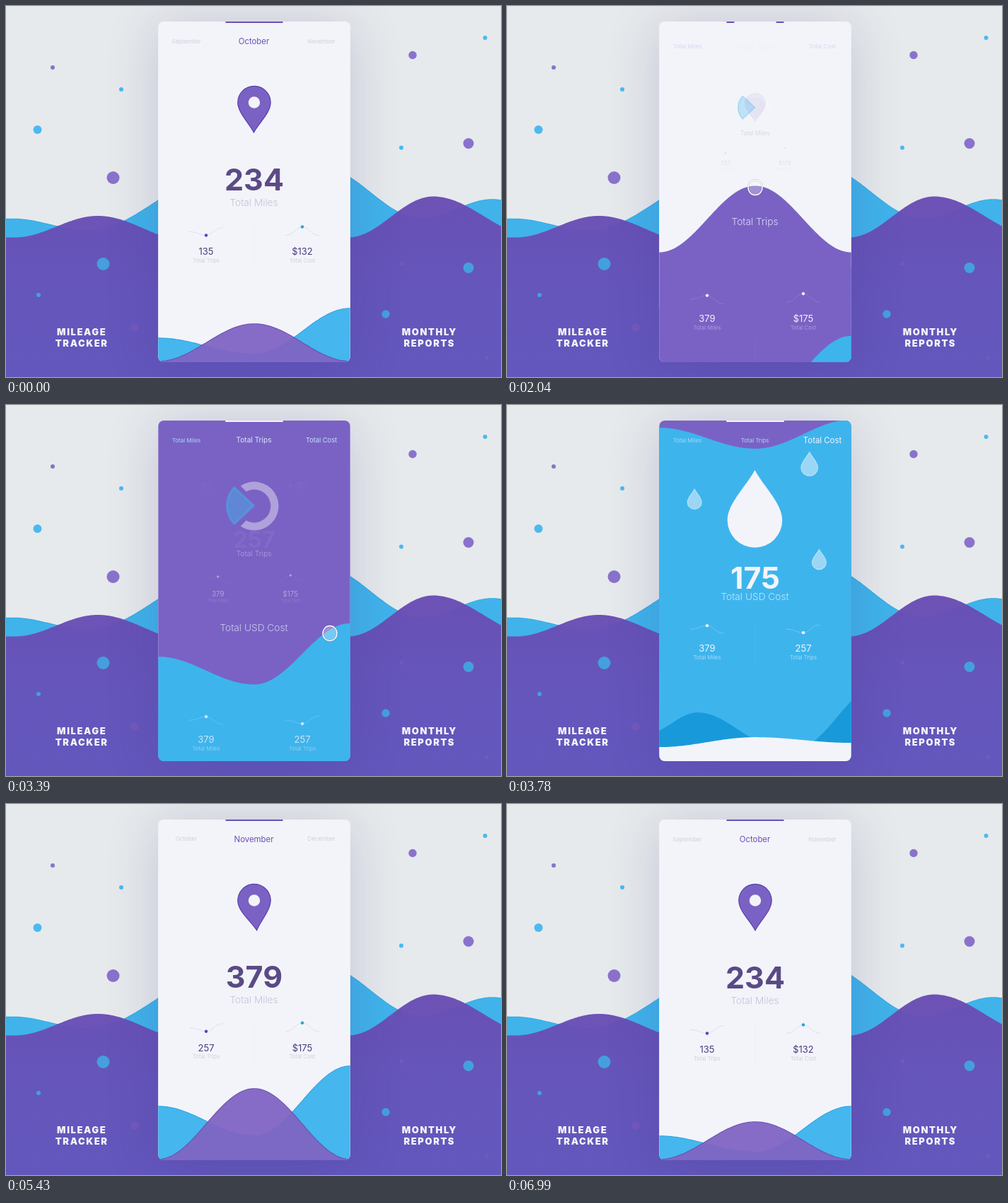
An HTML page with a canvas that plays this animation: 700 px wide and 525 px high, repeating every 7350 ms.

```html
<!DOCTYPE html>
<html lang="en">
<head>
<meta charset="utf-8">
<title>Mileage tracker</title>
<style>
html, body { margin: 0; width: 100%; height: 100%; overflow: hidden; background: #e6eaec; }
canvas { display: block; }
</style>
</head>
<body>
<canvas id="stage" width="700" height="525"></canvas>
<script>
const ctx = document.getElementById('stage').getContext('2d');
const LOOP = 7350, LEFT = 215.3, TOP = 22, WIDTH = 271.4, MID = 351, FLOOR = 503;
const WHITE = '#f3f4f9', BLUE = '#3eb4ed', PURPLE = '#7a62c4';

// Maths and easing
const clamp = v => Math.max(0, Math.min(1, v));
const lerp = (a, b, p) => a + (b - a) * p;
const settle = (t, span) => Math.exp(-((t / span) ** 2));
const spring = t => Math.cos(Math.PI * t / 1060) * settle(t, 400);
const ease = t => { const p = clamp(t / 750) ** .9; return p * p * (3 - 2 * p); };
const mix = (a, b, p) => 'rgb(' + [1, 3, 5].map(i =>
  Math.round(lerp(parseInt(a.slice(i, i + 2), 16), parseInt(b.slice(i, i + 2), 16), p))) + ')';

// Waves: cosine interpolation through a few points
const spread = (ys, x0, gap) => ys.map((y, i) => [x0 + i * gap, y]);
const across = ys => spread(ys, LEFT, WIDTH / (ys.length - 1));
function heightAt(pts, x) {
  if (x <= pts[0][0]) return pts[0][1];
  const i = pts.findIndex(p => p[0] >= x);
  if (i < 0) return pts[pts.length - 1][1];
  const [x0, y0] = pts[i - 1], [x1, y1] = pts[i];
  return lerp(y0, y1, (1 - Math.cos(Math.PI * (x - x0) / (x1 - x0))) / 2);
}
function trace(pts, from, to) {
  ctx.beginPath();
  for (let x = from; x <= to; x += 2) ctx.lineTo(x, heightAt(pts, x));
}
function hill(pts, fill, edge, from = 214, to = 488) {
  trace(pts, from, to);
  if (edge) { ctx.strokeStyle = edge; ctx.lineWidth = 1.6; ctx.stroke(); }
  ctx.lineTo(to, 526);
  ctx.lineTo(from, 526);
  ctx.fillStyle = fill;
  ctx.fill();
}

// Drawing helpers
function group(alpha, draw) {
  if (alpha <= 0) return;
  ctx.save();
  ctx.globalAlpha *= clamp(alpha);
  draw();
  ctx.restore();
}
function zoom(x, y, s, draw) {
  if (s <= 0) return;
  ctx.save();
  ctx.translate(x, y);
  ctx.scale(s, s);
  ctx.translate(-x, -y);
  draw();
  ctx.restore();
}
function text(str, x, y, size, color, weight = 400, align = 'center') {
  ctx.font = `${weight} ${size}px Inter, "Open Sans", sans-serif`;
  ctx.textAlign = align;
  ctx.fillStyle = color;
  ctx.fillText(str, x, y + size * .364);
}
function dot(x, y, r, color) {
  ctx.beginPath();
  ctx.arc(x, y, r, 0, 7);
  ctx.fillStyle = color;
  ctx.fill();
}
function teardrop(x, y, r, deg, fill, edge) {
  ctx.save();
  ctx.translate(x, y);
  ctx.rotate(deg * Math.PI / 180);
  ctx.scale(r, r);
  ctx.beginPath();
  ctx.moveTo(0, 1.83);
  ctx.bezierCurveTo(-.3, 1.25, -1, .62, -1, 0);
  ctx.arc(0, 0, 1, Math.PI, 0);
  ctx.bezierCurveTo(1, .62, .3, 1.25, 0, 1.83);
  ctx.closePath();
  ctx.fillStyle = fill;
  ctx.fill();
  if (edge) { ctx.strokeStyle = edge; ctx.lineWidth = 1.2 / r; ctx.stroke(); }
  ctx.restore();
}

// Screens
const light = { bg: WHITE, num: '#5a4a85', label: '#c3c0dc', sub: '#4b3b82', dim: '#cfcee0', tab: '#6a4fb8', line: '#dfdfea', dots: ['#5f43b5', '#2f9fdc'] };
const violet = { bg: PURPLE, num: WHITE, label: '#b9abe2', sub: WHITE, dim: '#ab9cda', tab: WHITE, line: '#8b76cd', dots: [WHITE, WHITE] };
const azure = { bg: BLUE, num: WHITE, label: '#c0e6fa', sub: WHITE, dim: '#a4daf6', tab: WHITE, line: '#6cc7f2', dots: [WHITE, WHITE] };
const months = ['August', 'September', 'October', 'November', 'December', 'January'];
const totals = ['Total Miles', 'Total Trips', 'Total Cost'];

// Each stat: value, caption, dot height, line start and end relative to the dot
const oct = { ...light, tabs: months, center: 2, active: 2, value: '234', caption: 'Total Miles', captionY: 278,
  stats: [['135', 'Total Trips', 324.5, -5, -11], ['$132', 'Total Cost', 312.5, 12, 12]],
  icon: () => pin(MID, 0), waves: () => strip(0) };
const nov = { ...light, tabs: months, center: 3, active: 3, value: '379', caption: 'Total Miles', captionY: 278,
  stats: [['257', 'Total Trips', 324.5, -5, -11], ['$175', 'Total Cost', 312.5, 12, 12]],
  icon: () => pin(MID, 0),
  waves: (e = 1) => strip(-WIDTH, { amp: .27 + .73 * e, purpleDrop: 27 * (1 - e), blueDrop: 74 * (1 - e) }),
  edge: [[486, 472, 480], [-71, -55, -128]] };
const trips = { ...violet, tabs: totals, center: 1, active: 1, value: '257', caption: 'Total Trips', captionY: 272,
  stats: [['379', 'Total Miles', 315, 5, 12], ['$175', 'Total Cost', 312.5, 12, 12]],
  icon: pie, waves: tripWaves, edge: [[503, 403, 503], [-20, -100, -20]] };
const cost = { ...azure, tabs: totals, center: 1, active: 2, value: '175', caption: 'Total USD Cost', captionY: 272,
  stats: [['379', 'Total Miles', 315, 5, 11], ['257', 'Total Trips', 325, -5, -11]],
  icon: drops, waves: costWaves, edge: [[445, 487, 388], [-25, 3, -30]] };

const steps = [
  { at: 0, from: oct, to: nov, dir: -1, end: 1350, finger: [480, 330] },
  { at: 1800, from: nov, to: trips, finger: [MID, 450] },
  { at: 3210, from: trips, to: cost, finger: [458, 455] },
  { at: 4650, from: cost, to: nov, finger: [458, 470], morph: true },
  { at: 6090, from: nov, to: oct, dir: 1, end: 900, finger: [236, 378] },
];

function strip(shift, { amp = 1, purpleDrop = 0, blueDrop = 0, lead = 0 } = {}) {
  const pts = (ys, drop, dx) => spread(ys.map(y => FLOOR - (FLOOR - y) * amp + drop), LEFT - WIDTH / 2 + shift + dx, WIDTH / 2);
  hill(pts([493, 470, 493, 428, 470, 371, 470], blueDrop, 0), '#45b6ee', '#219fdc');
  group(.94, () => hill(pts([450, 503, 450, 503, 403, 503, 403], purpleDrop, lead), '#8064c4', '#6243ad'));
}
function tripWaves(e = 1, k = 0) {
  const drop = 150 * k, low = y => y + drop;
  hill(spread([503, 439, 503].map(low), 251, 100), '#7056b8');
  hill(across([445, 487, 388].map(low)), BLUE);
}
function costWaves(e = 1, k = 0) {
  const drop = 120 * k;
  hill([[195, 468], [270, 437], [380, 483], [406, 489], [530, 395]].map(([x, y]) => [x, y + drop]), '#189ada');
  hill(across([486, 472, 480].map(y => y + drop)), WHITE);
}

function pin(x, deg) {
  teardrop(x, 136.5, 23.2, deg, PURPLE, '#5b3fae');
  dot(x, 136.5, 8.2, WHITE);
}
function pie() {
  ctx.beginPath();
  ctx.arc(MID, 144, 45.7, -2.165, 2.165);
  ctx.arc(MID, 144, 31, 2.08, -2.08, true);
  ctx.fillStyle = WHITE;
  ctx.fill();
  ctx.beginPath();
  ctx.moveTo(350, 143.2);
  ctx.arc(350, 143.2, 50, Math.PI * .76, Math.PI * 1.24);
  ctx.closePath();
  ctx.fillStyle = ctx.strokeStyle = BLUE;
  ctx.lineJoin = 'round';
  ctx.lineWidth = 4;
  ctx.fill();
  ctx.stroke();
}
function legend() {
  text('102', 272, 144, 13, WHITE, 400, 'right');
  text('Personal', 272, 156.5, 7.7, violet.dim, 400, 'right');
  text('Trips', 272, 166, 7.7, violet.dim, 400, 'right');
  dot(283, 144, 2, BLUE);
  dot(419, 144, 2.2, WHITE);
  text('152', 430, 143.5, 13, WHITE, 400, 'left');
  text('Business', 430, 156, 7.7, violet.dim, 400, 'left');
  text('Trips', 430, 165.5, 7.7, violet.dim, 400, 'left');
}
function droplets() {
  for (const [x, y, r] of [[266.5, 137.5, 9.8], [426.5, 89.3, 11.6], [440, 221.5, 9.8]])
    teardrop(x, y, r, 180, '#9bd6f5', '#b4e0f8');
}
function drops() {
  teardrop(350.5, 162.7, 38.2, 180, WHITE);
  droplets();
}

function tabs(s, center = s.center, active = s.active, dy = 0, tint = 1) {
  s.tabs.forEach((name, i) => {
    const on = clamp(1 - Math.abs(i - active));
    const color = tint < 1 ? mix('#e3f0fa', on ? s.tab : s.dim, tint) : mix(s.dim, s.tab, on);
    text(name, 350.5 + (i - center) * 95.5, 49.7 + dy, lerp(8, 11.4, on), color);
  });
}
function bar(s, dx = 0, size = 1) {
  ctx.fillStyle = s.tab;
  ctx.fillRect(MID + dx - 40.5 * size, TOP, 81 * size, 2);
}
function spark(x, y, a, b, line, color) {
  ctx.beginPath();
  ctx.moveTo(x - 24, y + a);
  ctx.bezierCurveTo(x - 12, y + a, x - 9, y, x, y);
  ctx.bezierCurveTo(x + 9, y, x + 12, y + b, x + 24, y + b);
  ctx.strokeStyle = line;
  ctx.lineWidth = 1;
  ctx.stroke();
  dot(x, y, 2.2, color);
}
function content(s, k = 0, numA = 1, labelA = 1, statA = 1, labelColor = s.label) {
  group(numA, () => {
    text(s.value, MID, 245 + 62 * k, 43, s.num, 700);
    if (s === trips) legend();
  });
  group(labelA, () => text(s.caption, 350.5, s.captionY + 62 * k, 13.7, labelColor, 300));
  group(statA, () => {
    const dy = 180 * k;
    s.stats.forEach(([value, name, y, a, b], i) => {
      const x = i ? 419 : 283;
      spark(x, y + dy, a, b, s.line, s.dots[i]);
      text(value, x, 347.5 + dy, 13, s.sub);
      text(name, x, 360.3 + dy, 7.7, s.dim);
    });
    ctx.strokeStyle = s.line;
    ctx.lineWidth = 1;
    ctx.setLineDash([1, 3]);
    ctx.beginPath();
    ctx.moveTo(MID, 314 + 300 * k);
    ctx.lineTo(MID, 368 + 300 * k);
    ctx.stroke();
    ctx.setLineDash([]);
  });
}
function paint(color) {
  ctx.fillStyle = color;
  ctx.fillRect(LEFT - 1, TOP - 1, WIDTH + 2, 484);
}

// Sideways move between months
function swipe({ from, to, dir, end }, t) {
  const left = settle(t, 240), wobble = t < end ? Math.sin(Math.PI * t / 450) * dir : 0;
  const sway = 6 * wobble * Math.exp(-t / 1200), swing = wobble * Math.exp(-t / 338);
  const center = lerp(to.center, from.center, settle(t, 160));
  paint(WHITE);
  strip(-WIDTH * lerp(to === nov ? 1 : 0, from === nov ? 1 : 0, left) - 2 * sway,
    { blueDrop: 16 * swing * dir, lead: -14 * swing });
  const slide = (s, x, alpha) => group(alpha, () => { ctx.translate(x, 0); content(s); });
  slide(from, dir * WIDTH * (1 - left), 1 - t / 180);
  slide(to, -dir * WIDTH * left, t / 280);
  pin(MID + sway, -102 * swing);
  tabs(to, center, center);
  bar(to, sway);
}

// A wave of the next colour rises over the card
function rise({ from, to, morph }, t) {
  const e = ease(t), k = spring(t), sameTabs = from.tabs === to.tabs;
  if (e < 1) {
    paint(from.bg);
    from.waves();
    bar(from);
    if (!sameTabs) group(1 - 4 * e, () => tabs(from));
    zoom(MID, TOP, 1 - 1.3 * e, () => content(from, 0, 1 - 5 * e, 1 - .8 * e, 1 - 3 * e));
    if (!morph) group(1 - 3 * e, () => zoom(MID, 140, 1 - 1.3 * e, from.icon));
  }

  ctx.save();
  if (e < 1) {
    const [start, stop] = to.edge;
    trace(across(start.map((y, i) => lerp(y, stop[i], e))), 214, 488);
    ctx.lineTo(488, 526);
    ctx.lineTo(214, 526);
    ctx.clip();
  }
  paint(to.bg);
  to.waves(e, k);
  ctx.restore();

  content(to, k, (e - .35) * 3, e * 4, e * 4, mix('#e3f0fa', to.label, e));
  if (sameTabs) {
    tabs(to, to.center, lerp(from.active, to.active, clamp(2 * e)));
    bar(to);
  } else {
    group(e * 4, () => {
      tabs(to, to.center, to.active, 15 * k, e);
      bar(to, 0, 1 - .38 * (1 - e));
    });
  }
  if (morph) turnDrop(t, e);
  else group((e - .2) * 3, () => zoom(MID, 144, 1 - k, to.icon));
}
function turnDrop(t, e) {
  const m = 1 - settle(t, 160);
  let deg = 180 * (1 - e ** 1.75);
  if (t > 750 && t < 1260) deg -= 14 * Math.sin(Math.PI * (t - 750) / 255) * (1260 - t) / 510;
  group(1 - 4 * e, droplets);
  const y = lerp(162.7, 136.5, m);
  teardrop(MID, y, lerp(38.2, 23.2, m), deg, mix(WHITE, PURPLE, e * .85 + .15 * e * e), mix(WHITE, '#5b3fae', e));
  group(e, () => dot(MID, y, 8.2 * clamp(.3 + e), WHITE));
}
function finger({ dir, finger: [a, b] }, t) {
  const p = 1 - settle(t, 240);
  group(Math.min(t / 90, (520 - t) / 180), () => {
    ctx.beginPath();
    if (dir) ctx.ellipse(lerp(a, b, p), 490.5, 11, 9, 0, 0, 7);
    else ctx.ellipse(a, b - 304 * p, 10, 10.6, 0, 0, 7);
    ctx.fillStyle = 'rgba(255,255,255,.3)';
    ctx.fill();
    ctx.strokeStyle = 'rgba(90,80,140,.35)';
    ctx.lineWidth = 2.4;
    ctx.stroke();
    ctx.strokeStyle = '#fff';
    ctx.lineWidth = 1.4;
    ctx.stroke();
  });
}

// Scenery behind the card
const ground = ctx.createLinearGradient(0, 270, 0, 525);
ground.addColorStop(0, '#6a4db3');
ground.addColorStop(.5, '#6653ba');
ground.addColorStop(1, '#6454bb');
const bubbles = {
  '#8a72cc': [[66, 87, 3], [151.5, 243, 9], [575, 69.5, 5.7], [654, 194.5, 7.5]],
  '#4bb9f0': [[163, 118, 3], [44.5, 175, 6], [677.5, 45, 3], [559, 200.5, 3]],
  '#459fde': [[137.5, 365, 9], [46, 409, 3], [654, 370.5, 7.5], [537, 436, 5.7]],
  '#7259bb': [[182, 455, 6], [559, 364.5, 3], [680, 498, 3]],
};
function scenery() {
  ctx.fillStyle = '#e6eaec';
  ctx.fillRect(0, 0, 700, 525);
  hill([[10, 301.5], [115, 318], [310, 236], [442, 227], [588, 301], [688, 274], [760, 290]], '#40b3eb', '#2ba6e2', 0, 700);
  group(.97, () => hill([[12, 327.5], [130, 297], [260, 333], [484, 327.5], [604, 269.5], [747, 325]], ground, '', 0, 700));
  for (const color in bubbles) bubbles[color].forEach(b => dot(...b, color));
  ctx.letterSpacing = '1.6px';
  text('MILEAGE', 107.2, 461.5, 13, WHITE, 900);
  text('TRACKER', 107.2, 477, 13, WHITE, 900);
  text('MONTHLY', 598.8, 461.5, 13, WHITE, 900);
  text('REPORTS', 598.8, 477, 13, WHITE, 900);
  ctx.letterSpacing = '0px';
}

const card = new Path2D();
card.roundRect(LEFT, TOP, WIDTH, 482, 8);

function draw(now) {
  const t = now % LOOP;
  const step = steps.filter(s => s.at <= t).pop();
  const local = t - step.at;
  scenery();
  ctx.save();
  ctx.shadowColor = 'rgba(60,45,125,.2)';
  ctx.shadowBlur = 75;
  ctx.shadowOffsetY = 6;
  ctx.fillStyle = WHITE;
  ctx.fill(card);
  ctx.restore();
  ctx.save();
  ctx.clip(card);
  (step.dir ? swipe : rise)(step, local);
  ctx.restore();
  finger(step, local);
}

const begin = performance.now();
function tick() {
  draw(performance.now() - begin);
  requestAnimationFrame(tick);
}
tick();
</script>
</body>
</html>
```
